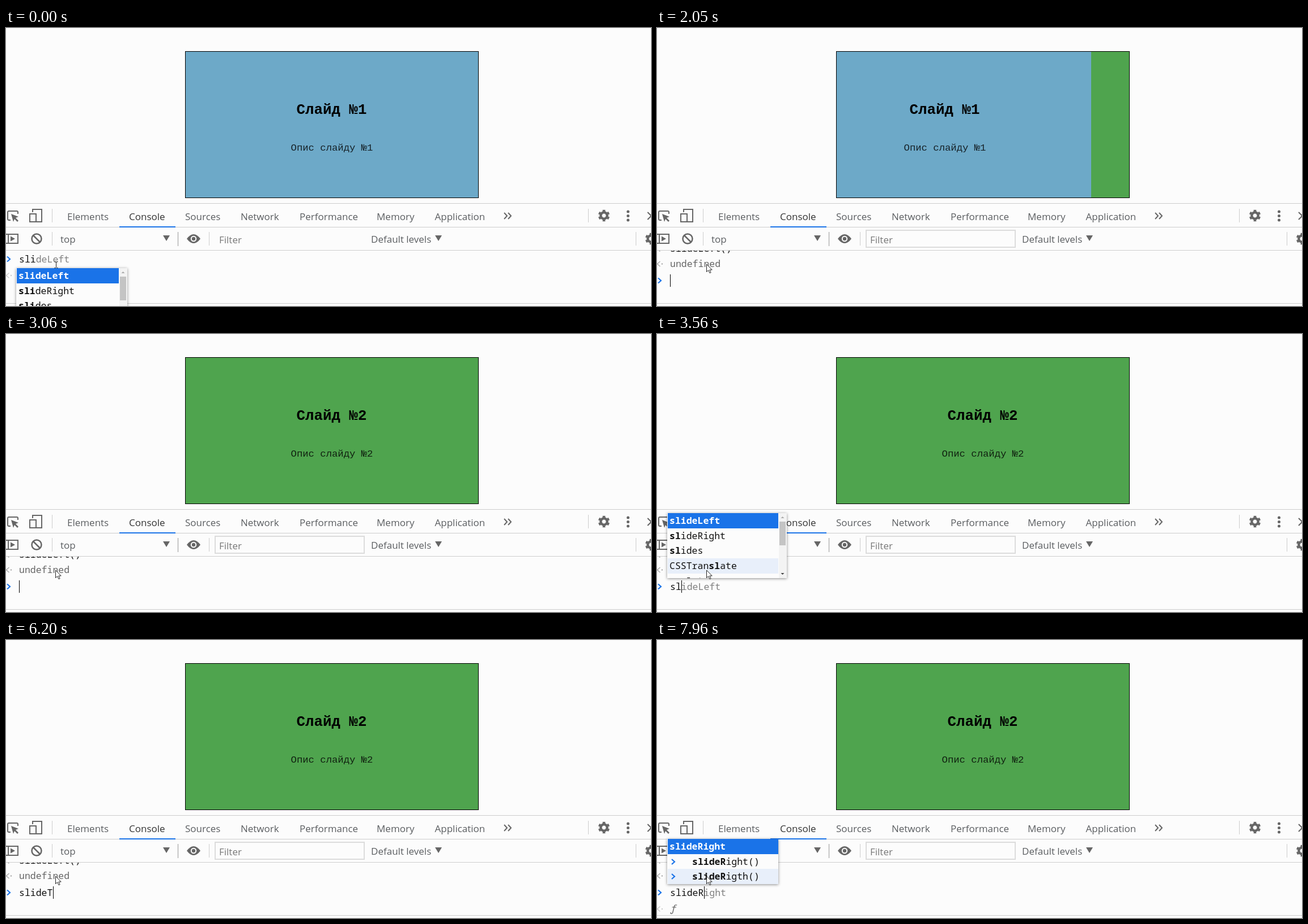
An HTML page that plays this animation: 1138 px wide and 492 px high, repeating every 8000 ms.

```html
<!DOCTYPE html>
<html lang="uk">
<head>
<meta charset="utf-8">
<title>Slider in the console</title>
<style>
  html, body { margin: 0; width: 100%; height: 100%; overflow: hidden; background: #fcfcfc; }
  svg { display: block; }
  text { white-space: pre; }
  rect { shape-rendering: crispEdges; }
  .ui { font: 17px "Open Sans", "Noto Sans", sans-serif; fill: #5a5d60; }
  .code { font: 16.5px "Noto Sans Mono", monospace; }
  .slide { font: 17.25px "Liberation Mono", monospace; text-anchor: middle; fill: #000; }
  .slide .title { font-size: 25.8px; font-weight: bold; }
  .icon { fill: none; stroke: #666; stroke-width: 2; }
  .solid { fill: #666; }
  .rule { stroke: #cdcdcd; }
  .b { font-weight: bold; }
  .chevron { fill: none; stroke: #1a73e8; stroke-width: 2.2; }
  .shadow { filter: drop-shadow(0 1px 2.5px rgba(0, 0, 0, .45)); }
</style>
</head>
<body>
<svg width="1138" height="492" viewBox="0 0 1138 492">
  <defs>
    <clipPath id="frame"><rect x="317" y="42" width="516" height="258"/></clipPath>
    <clipPath id="log"><rect y="394" width="1138" height="93"/></clipPath>
    <g id="gear" class="icon">
      <circle r="5.7" stroke-width="4.4"/>
      <circle r="8.8" stroke-width="3" pathLength="12" stroke-dasharray="1" stroke-dashoffset="-.5"/>
    </g>
  </defs>

  <g clip-path="url(#frame)"><g id="slides" class="slide"></g></g>
  <rect x="316.5" y="41.5" width="517" height="259" fill="none" stroke="#000"/>

  <path class="rule" d="M0 310.5H1138M0 352.5H1138M0 393.5H1138M0 487.5H1138
    M81.5 320V344M1027.5 320V344M81.5 361V385M358.5 361V385M1111.5 361V385"/>
  <path d="M303.5 361V386" stroke="#999"/>
  <rect x="200" y="351" width="99" height="2" fill="#1a73e8"/>
  <g id="tabs" class="ui"></g>
  <g class="ui">
    <text x="96" y="380">top</text>
    <text x="376" y="381" fill="#777">Filter</text>
    <text x="644" y="380">Default levels</text>
  </g>
  <rect id="field" x="369" y="358" width="263" height="30" fill="none" stroke="#dcdcdc" stroke-width="2"/>

  <g class="icon">
    <path d="M8 340H5Q3 340 3 338V326Q3 324 5 324H19Q21 324 21 326V329"/>
    <path d="M47 326V321H63V343H54"/>
    <path d="M42 329H53V343H42z"/>
    <path d="M879 327l5 5.5-5 5.5M886 327l5 5.5-5 5.5"/>
    <path d="M1132 326l13 13M1132 339l13-13"/>
    <path d="M0 365H21V381H0M4 365V381"/>
    <circle cx="54" cy="373" r="8.5" stroke-width="2.5"/>
    <path d="M48 367l12 12" stroke-width="2.5"/>
  </g>
  <g class="solid">
    <path d="M9 329l13 5-5 2 5 5-2 2-5-5-2 5z"/>
    <path d="M8 368.5v9l8-4.5z"/>
    <path d="M277 367h12l-6 10zM757 367h12l-6 10z"/>
    <circle cx="1097.5" cy="325" r="2.5"/><circle cx="1097.5" cy="332.5" r="2.5"/><circle cx="1097.5" cy="340" r="2.5"/>
    <path d="M319 373Q331 357 343 373Q331 389 319 373z"/>
  </g>
  <circle cx="331" cy="373" r="4.2" fill="#666" stroke="#fcfcfc" stroke-width="2"/>
  <use href="#gear" x="1055" y="332"/>
  <use href="#gear" x="1138" y="373"/>

  <g id="console" class="code" clip-path="url(#log)"></g>
  <g id="popup" class="code"></g>
  <path id="beam" d="M85.5 413.5h2l1 1 1-1h2M88.5 414V423M85.5 424.5h2l1-1 1 1h2" fill="none" stroke="#222"/>
  <path id="arrow" d="M87.5 418v13.5l3.2-2.8 2.3 5 2.1-1-2.2-4.7h4.3z" fill="#fff" stroke="#222"/>
</svg>
<script>
const $ = id => document.getElementById(id);
const LOOP = 8000, EXECUTED = 2050, ROW = 26.67;

$('tabs').innerHTML = [['Elements', 108], ['Console', 217], ['Sources', 316], ['Network', 414],
  ['Performance', 518], ['Memory', 654], ['Application', 756.5]]
  .map(([name, x]) => `<text x="${x}" y="340"${name == 'Console' ? ' fill="#333"' : ''}>${name}</text>`).join('');

$('slides').innerHTML = ['#6da9c8', '#4fa44e'].map((color, i) => `
  <g transform="translate(${i * 516})">
    <rect x="317" y="42" width="516" height="258" fill="${color}"/>
    <text class="title" x="574.5" y="152">Слайд №${i + 1}</text>
    <text x="575" y="217" fill-opacity=".8">Опис слайду №${i + 1}</text>
  </g>`).join('');

// Suggestion lists: width, then rows; ">" marks a row from the history
const names = ['slideLeft', 'slideRight', 'slides'];
const lists = {
  sli: [196, ...names, 'CSSTranslate'],
  s: [460, ...names, 'scheduler', 'screen'],
  sl: [211, ...names, 'CSSTranslate', 'onslotchange'],
  slide: [196, ...names, '>slideLeft()', '>slideRight()', '>slideRigth()'],
  left: [186, 'slideLeft', '>slideLeft()'],
  right: [196, 'slideRight', '>slideRight()', '>slideRigth()']
};

// time, typed, completion, caret, preview, list, slide offset
const steps = [
  [0, 'sli', 'deLeft', 0, 1, 'sli', 0],
  [420, 'slideLeft', '', 1, 1, '', 0],
  [820, 'slideLeft', '', 0, 1, '', 0],
  [1250, 'slideLeft()', '', 1, 0, '', 0],
  [1800, 'slideLeft()', '', 0, 0, '', 0],
  [2050, '', '', 1, 0, '', 67],
  [2200, '', '', 1, 0, '', 362],
  [2320, '', '', 1, 0, '', 475],
  [2440, '', '', 0, 0, '', 516],
  [3060, '', '', 1, 0, '', 516],
  [3310, 's', 'lideLeft', 1, 0, 's', 516],
  [3560, 'sl', 'ideLeft', 1, 0, 'sl', 516],
  [3710, 'sl', 'ideLeft', 1, 1, 'sl', 516],
  [4140, 'sl', 'ideLeft', 0, 1, 'sl', 516],
  [4570, 'sl', 'ideLeft', 1, 1, 'sl', 516],
  [4850, 'slideLeft', '', 1, 1, '', 516],
  [5250, 'slideLef', 't', 1, 1, 'left', 516],
  [5370, 'slideLe', 'ft', 1, 1, 'left', 516],
  [5520, 'slideL', 'eft', 1, 1, 'left', 516],
  [5640, 'slide', 'Left', 1, 1, 'slide', 516],
  [6200, 'slideT', '', 1, 0, '', 516],
  [6600, 'slide', 'Left', 1, 0, 'slide', 516],
  [6720, 'slide', 'Left', 1, 1, 'slide', 516],
  [6870, 'slideR', 'ight', 1, 1, 'right', 516],
  [7370, 'slideR', 'ight', 0, 1, 'right', 516],
  [7960, 'slideR', 'ight', 1, 1, 'right', 516]
];

const text = (x, y, s, color = '#111', attrs = '') => `<text x="${x}" y="${y}" fill="${color}" ${attrs}>${s}</text>`;
const chevron = (x, y) => `<path class="chevron" d="M${x} ${y - 4.5}l5 4.5-5 4.5"/>`;
const result = (y, color) => `<path d="M5.5 ${y - 4.5}l-5 4.5 5 4.5" fill="none" stroke="${color}" stroke-width="1.5"/>
  <circle cx="9" cy="${y}" r="1.2" fill="${color}"/>`;

function drawConsole(typed, ghost, caret, preview, done) {
  const y = done ? 447 : 409;
  let out = chevron(2, y) + text(23, y + 6, `${typed}<tspan fill="#808080">${ghost}</tspan>`);
  if (done) out += text(23, 396, 'slideLeft()') + result(391, '#aaa')
    + text(23, 423, 'undefined', '#666') + result(417.5, '#aaa');
  if (preview) out += result(y + 29, '#ccc') + text(23, y + 34, 'ƒ', '#666', 'font-style="italic"');
  if (caret) out += `<rect x="${Math.round(23.4 + 9.9 * typed.length)}" y="${y - 11}" width="1" height="22" fill="#000"/>`;
  return out;
}

function scrollbar(x, top, h) {
  return `<rect x="${x}" y="${top}" width="14" height="${h}" fill="#f3f3f3"/>
    <rect x="${x + 1}" y="${top + 15}" width="11" height="42" fill="#c4c4c4"/>
    <path d="M${x + 3.5} ${top + 9}h6l-3-3z" fill="#aaa"/>
    <path d="M${x + 3.5} ${top + h - 9}h6l-3 3z" fill="#444"/>`;
}

function drawPopup(typed, name, done) {
  if (!name) return '';
  const [w, ...rows] = lists[name];
  const h = Math.round(Math.min(115, rows.length * ROW)), top = done ? 432 - h : 425;
  const scroll = rows.length > 3, rowW = scroll ? w - 16 : w - 1;
  const items = rows.map((row, i) => {
    const y = Math.round(top + i * ROW), past = row[0] == '>', label = past ? row.slice(1) : row;
    const hover = done && y <= 418 && y + ROW > 418;
    const fill = i == 0 ? '#1a73e8' : hover ? '#e8effa' : '#fcfcfc';
    return `<rect x="19" y="${y}" width="${rowW}" height="27" fill="${fill}"/>`
      + (past ? chevron(26, y + 13.5) : '')
      + text(past ? 62 : 22, y + 19, label.replace(typed, '<tspan class="b">$&</tspan>'),
        i ? '#111' : '#fff', i ? '' : 'font-weight="600"');
  }).join('');
  return `<rect class="shadow" x="18" y="${top}" width="${w}" height="${h}" fill="#fcfcfc"/>
    <clipPath id="list"><rect x="18" y="${top}" width="${w}" height="${h}"/></clipPath>
    <g clip-path="url(#list)">${items}${scroll ? scrollbar(18 + w - 14, top, h) : ''}</g>`;
}

const show = (id, on) => $(id).setAttribute('visibility', on ? 'visible' : 'hidden');
const start = performance.now();
let shown;

function draw() {
  const t = (performance.now() - start) % LOOP, step = steps.findLast(s => s[0] <= t);
  if (step != shown) {
    shown = step;
    const [time, typed, ghost, caret, preview, list, offset] = step;
    const done = time >= EXECUTED;
    $('slides').setAttribute('transform', `translate(${-offset})`);
    $('console').innerHTML = drawConsole(typed, ghost, caret, preview, done);
    $('popup').innerHTML = drawPopup(typed, list, done);
    show('field', done);
    show('arrow', done);
    show('beam', !done);
  }
  requestAnimationFrame(draw);
}
draw();
</script>
</body>
</html>
```
